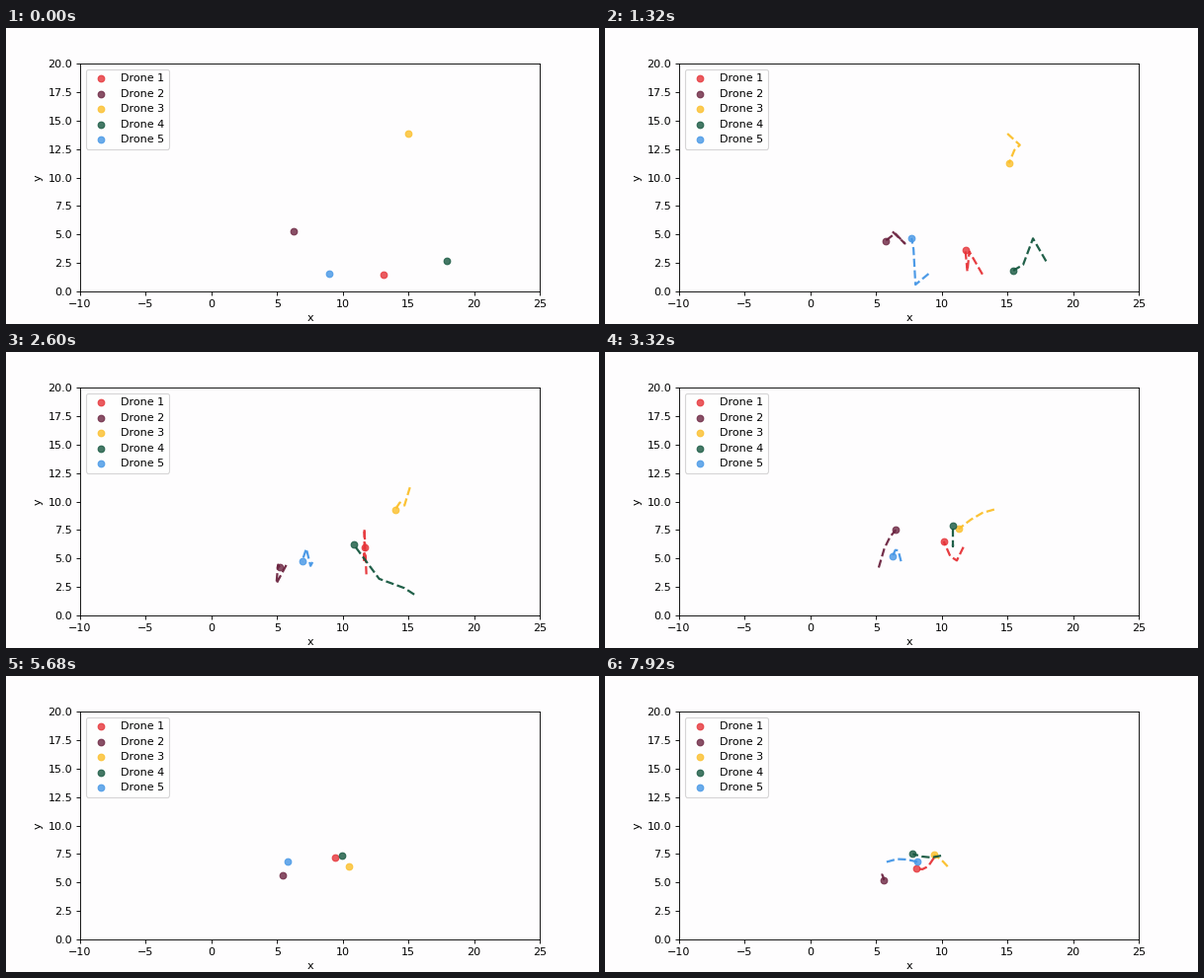
A matplotlib script for the animation above (8000 ms loop, 600 by 300 pixels).

```python
import numpy as np
import matplotlib.pyplot as plt
from matplotlib.animation import FuncAnimation

FRAMES, INTERVAL = 200, 40
STEPS, TRAIL = 24, 3
PAPER = "#fefdfe"

# Each drone: colour, vertical swing of its first flight, and the points
# it passes at these hops.
HOPS = [0, 1, 4, 6, 9, 12, 13, 16]
DRONES = [
    ("#e63237", -5.0, [(13.1, 1.5), (12.1, 3.5), (11.65, 7.6), (11.65, 6.0),
                       (10.15, 6.5), (10.55, 7.7), (9.4, 7.15), (8.1, 6.2)]),
    ("#6b2440", 2.2, [(6.25, 5.25), (7.2, 4.2), (4.95, 2.8), (5.2, 4.2),
                      (6.5, 7.5), (5.35, 5.4), (5.4, 5.65), (5.6, 5.2)]),
    ("#fbbf2a", 1.0, [(15.0, 13.85), (15.95, 12.85), (14.7, 9.65), (14.0, 9.3),
                      (11.3, 7.6), (10.45, 7.0), (10.45, 6.4), (9.4, 7.45)]),
    ("#15573f", -2.5, [(17.95, 2.65), (16.95, 4.65), (14.7, 2.4), (10.85, 6.2),
                       (10.85, 7.85), (10.05, 7.35), (9.95, 7.35), (7.8, 7.5)]),
    ("#4496e6", 3.0, [(9.0, 1.55), (8.0, 0.6), (7.55, 4.35), (6.9, 4.75),
                      (6.25, 5.2), (6.25, 6.4), (5.8, 6.8), (8.15, 6.8)]),
]


def hops_done(step):
    """Drones wait one step, and rest again from step 14 to 20."""
    return np.clip(step - 1, 0, 13) + np.maximum(step - 20, 0)


def fly(points, swing):
    """Position at every step: legs between points, bowed by a fading swing."""
    hop = hops_done(np.arange(STEPS))
    x, y = (np.interp(hop, HOPS, axis) for axis in zip(*points))
    leg = np.interp(hop, HOPS, range(len(HOPS)))
    bow = swing * np.exp(-hop / 6) * np.sin(np.pi * (leg % 1))
    return np.column_stack([x, y + bow])


fig, ax = plt.subplots(figsize=(7.5, 3.75), dpi=80, facecolor=PAPER)
ax.set_facecolor(PAPER)
ax.set(xlim=(-10, 25), ylim=(0, 20), xlabel="x", ylabel="y")

paths, dots, trails = [], [], []
for i, (color, swing, points) in enumerate(DRONES, 1):
    paths.append(fly(points, swing))
    dots.append(ax.scatter(*points[0], color=color, alpha=0.8,
                           label=f"Drone {i}"))
    trails += ax.plot([], [], "--", color=color, lw=2, alpha=0.95)
ax.legend(loc="upper left")


def update(frame):
    step = (3 * frame + 1) // 25  # three moves a second
    for path, dot, trail in zip(paths, dots, trails):
        dot.set_offsets(path[step])
        trail.set_data(*path[max(0, step - TRAIL):step + 1].T)
    return dots + trails


anim = FuncAnimation(fig, update, frames=FRAMES, interval=INTERVAL,
                     init_func=lambda: update(0), repeat=True, repeat_delay=0)
plt.show()
```
